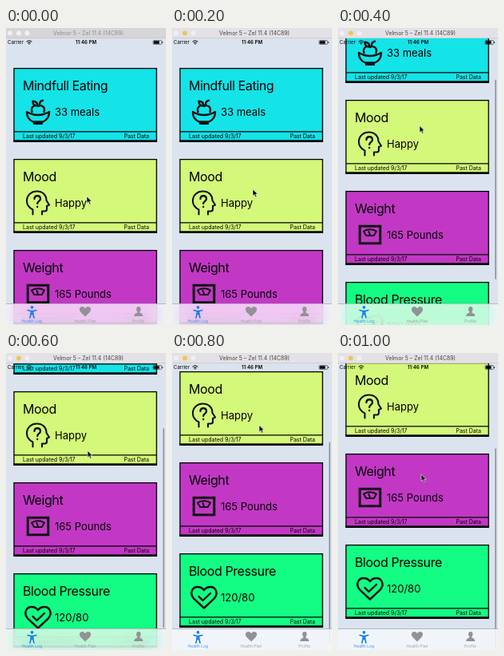
These frames come from a looping animation (200 by 372 pixels, 1.2 s). An HTML page:

```html
<!DOCTYPE html>
<html lang="en">
<head>
<meta charset="utf-8">
<title>Health Log</title>
<style>
  html, body { margin: 0; width: 100%; height: 100%; overflow: hidden; background: #dae3ee; }
  #stage { position: relative; width: 200px; height: 372px; overflow: hidden; }
  svg { position: absolute; inset: 0; width: 200px; height: 372px; }
  text { font-family: Inter, "Liberation Sans", sans-serif; fill: #000; }
  .title { font-size: 16px; letter-spacing: -.4px; }
  .value { font-size: 13px; }
  .foot { font-size: 7px; }
  .status { font-size: 6.1px; }
  .tab { font-size: 5px; text-anchor: middle; }
  .end { text-anchor: end; }
  .mid { text-anchor: middle; }
  .icon { fill: none; stroke: #111; stroke-width: 2.4; stroke-linejoin: round; stroke-linecap: round; }
  #glass {
    position: absolute; left: 0; top: 345px; width: 200px; height: 27px;
    box-sizing: border-box; border-top: .5px solid #b4b8bf;
    background: rgba(249, 250, 252, .76); backdrop-filter: blur(10px) saturate(1.6);
  }
</style>
</head>
<body>
<div id="stage">
  <svg viewBox="0 0 200 372">
    <rect width="200" height="372" fill="#dae3ee"/>
    <g id="list"></g>
    <rect id="thumb" x="196.3" y="13" width="1.5" height="250" rx=".75" fill="#868c95"/>
  </svg>
  <div id="glass"></div>
  <svg viewBox="0 0 200 372">
    <!-- window bar, dimmed until the window is active -->
    <rect width="200" height="13" fill="#d6d5d8"/>
    <rect id="bar" width="200" height="13" fill="#e4e1e6"/>
    <rect y="12.4" width="200" height=".6" fill="#c3c2c4"/>
    <g fill="#f1eff1">
      <circle cx="5" cy="6.5" r="3"/>
      <circle cx="16" cy="6.5" r="3"/>
      <circle cx="26.500" cy="6.5" r="3"/>
    </g>
    <circle id="light" cx="16" cy="6.5" r="3" fill="#f0c455"/>
    <text id="name" class="mid" x="103" y="9" font-size="6.9" style="fill:#444">Velmor 5 – Zel 11.4 (14C89)</text>

    <!-- status bar -->
    <text class="status" x="2" y="20.3">Carrier</text>
    <g fill="none" stroke="#000" stroke-width="1">
      <path d="M25.6 17.2q3.4-3 6.8 0M27 18.9q2-1.6 4 0"/>
      <path d="M28.4 20l.6.6.6-.6z" fill="#000" stroke-width=".5"/>
    </g>
    <text class="status mid" x="100" y="20.3" font-weight="600">11:46 PM</text>
    <rect x="184" y="15.6" width="10.5" height="4.8" rx="1" fill="none" stroke="#000" stroke-width=".5"/>
    <rect x="184.600" y="16.2" width="7" height="3.6" rx=".5"/>
    <rect x="195.2" y="17.2" width=".9" height="1.8" rx=".4"/>

    <!-- tabs -->
    <g stroke="#0f7af0" stroke-linecap="round" stroke-linejoin="round" fill="none">
      <circle cx="32.5" cy="349.9" r="1.8" fill="#0f7af0" stroke="none"/>
      <path d="M27.2 353.4l4 1.2h2.6l4-1.2" stroke-width="1.6"/>
      <path d="M31.4 355h2.2v3h-2.2z" stroke-width="1.8"/>
      <path d="M31.3 358l-1.3 5M33.7 358l1.3 5" stroke-width="1.6"/>
    </g>
    <g fill="#929296">
      <path d="M99 361.5l-5.6-5.6C90.2 352 92.7 349 95.3 349q2.4 0 3.7 2.2 1.3-2.2 3.7-2.2c2.6 0 5.1 3 1.9 6.9z"/>
      <ellipse cx="165.7" cy="352.3" rx="2.7" ry="3.3"/>
      <path d="M164.2 354h3v2.4q4 1 4.1 4.6h-11.2q.1-3.6 4.1-4.6z"/>
    </g>
    <text class="tab" x="32.3" y="368.6" style="fill:#3c92f2">Health Log</text>
    <text class="tab" x="99" y="368.6" style="fill:#a0a0a4">Health Plan</text>
    <text class="tab" x="165.7" y="368.6" style="fill:#a0a0a4">Profile</text>

    <path id="cursor" d="M0 0v8.4l2-1.8 1.4 3.1 1.5-.7-1.4-3h2.7z" fill="#000" stroke="#fff" stroke-width=".6"/>
  </svg>
</div>
<script>
const icons = {
  bowl: `<path d="M26 55q14 8 28 0c0 6.5-3 10.500-8 12.500h-12C29 65.500 26 61.500 26 55zM35 69.800h10"/>
    <path d="M32.500 55c-2-6 3-9.500 7.500-7 4.500-2.500 9.500 1 7.500 7M39.500 47.500c-4 0-6-2-6-5.800 4 0 6 2 6 5.800zM42 46c0-3 1.500-4.800 4-5.200"/>`,
  head: `<path d="M33.500 69.500v-6C28.500 61 26 56.500 26 52.500 26 45 32 40.500 38.500 40.500c7 0 12 4.500 12 11.500l3.500 5.500-3 1.500v4q0 2.500-2.500 2.500h-3.500v4" stroke-width="2.100"/>
    <path d="M35.500 50c0-5 7.500-5 7.500 0 0 2.800-3.800 3-3.800 6M39.200 60v.2" stroke-width="2.300"/>`,
  scale: `<path d="M27.200 44.200h25.600v21.600H27.200z" stroke-width="3" stroke-linejoin="miter"/>
    <path d="M32 50.500q8-4.500 16 0l-3.200 5.500h-9.600zM40 55l-1.500-4" stroke-width="2"/>`,
  heart: `<path d="M40 68.500L27 56.300C21.500 49.500 25.500 42 32 42q5 0 8 4 3-4 8-4c6.500 0 10.500 7.500 5 14.300z"/>
    <path d="M33.500 54l5 5 9.500-9"/>`
};

const cards = [
  ["Mindfull Eating", "33 meals", "#14e3e8", "bowl"],
  ["Mood", "Happy", "#d4f879", "head"],
  ["Weight", "165 Pounds", "#c238c5", "scale"],
  ["Blood Pressure", "120/80", "#13fd84", "heart"]
];

const TOP = 50, PITCH = 114, LOOP = 1200;

const card = ([title, value, color, icon], i) => `
  <g transform="translate(0 ${TOP + i * PITCH})">
    <rect x="10" y=".6" width="178.200" height="91" fill="${color}" stroke="#000" stroke-width="1.300"/>
    <path d="M10 79.800h178" stroke="#000" stroke-width="1.200"/>
    <rect x="9.400" y="90.300" width="179.400" height="2.700"/>
    <text class="title" x="21" y="28">${title}</text>
    <g class="icon">${icons[icon]}</g>
    <text class="value" x="61" y="60">${value}</text>
    <text class="foot" x="21" y="88">Last updated 9/3/17</text>
    <text class="foot end" x="179" y="88">Past Data</text>
  </g>`;

const $ = id => document.getElementById(id);
$("list").innerHTML = cards.map(card).join("");

// One row per step: scroll offset, pointer x, pointer y, window active
const steps = [
  [0, 101, 211, 0],
  [0, 101, 202, 1],
  [74, 102, 122.5, 1],
  [116, 102, 122.5, 1],
  [141, 109, 90.5, 1],
  [152, 104, 152, 1]
];

function play(id, pose) {
  const frames = steps.map((s, i) => ({ ...pose(s), offset: i / steps.length, easing: "step-end" }));
  frames.push({ ...pose(steps.at(-1)), offset: 1 });
  $(id).animate(frames, { duration: LOOP, iterations: Infinity });
}

const move = (x, y) => `translate(${x}px, ${y}px)`;
play("list", ([scroll]) => ({ transform: move(0, -scroll) }));
play("thumb", ([scroll]) => ({ transform: move(0, scroll * .7), opacity: scroll ? 1 : 0 }));
play("cursor", ([, x, y]) => ({ transform: move(x, y) }));
play("bar", ([, , , active]) => ({ opacity: active }));
play("light", ([, , , active]) => ({ opacity: active }));
play("name", ([, , , active]) => ({ opacity: active ? 1 : .5 }));
</script>
</body>
</html>
```
